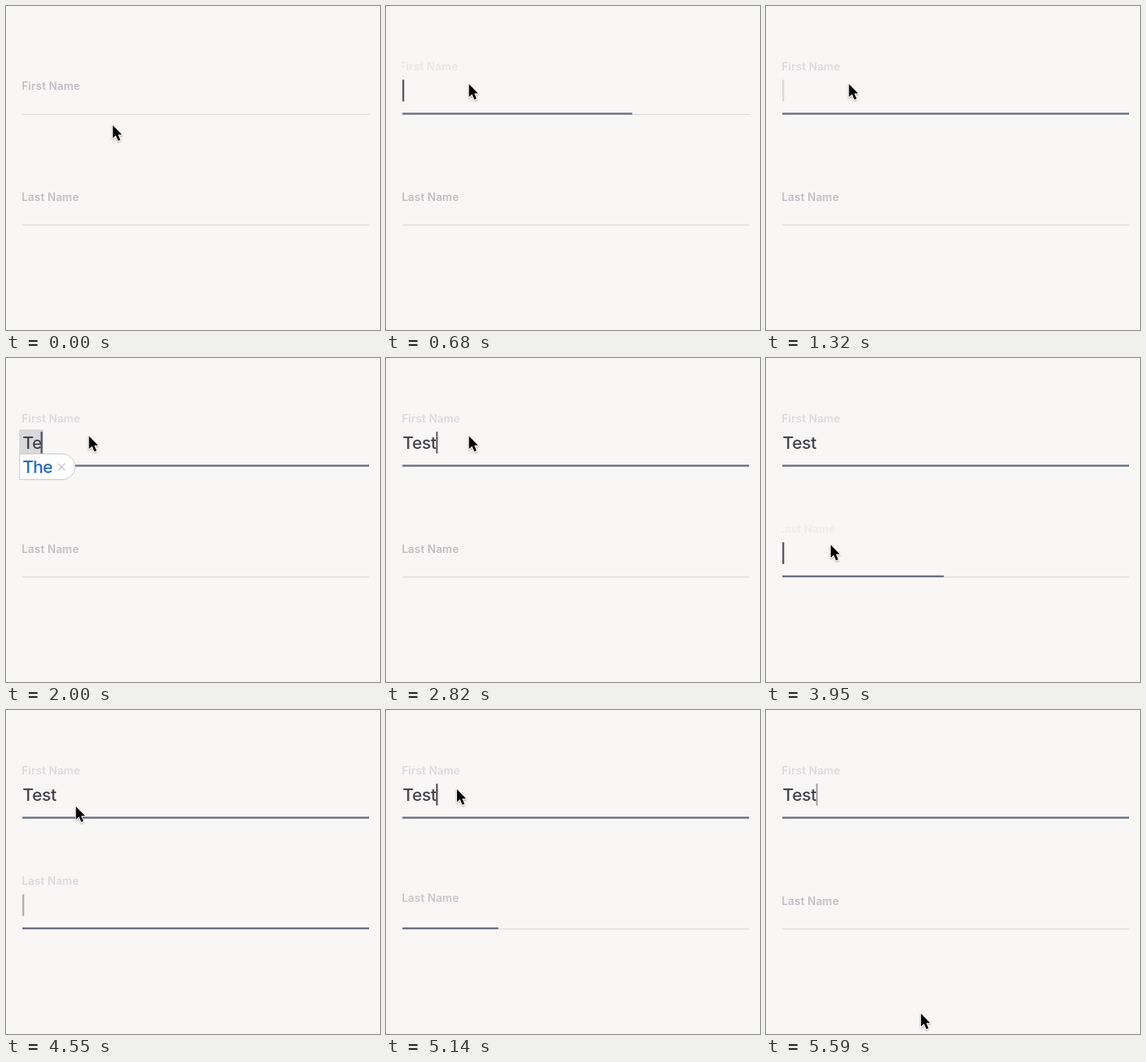
An HTML page for the animation above (5.63 s loop, 480x417 px).

```html
<!DOCTYPE html>
<html lang="en">
<head>
<meta charset="utf-8">
<title>Form fields</title>
<style>
  html, body { margin: 0; width: 100%; height: 100%; overflow: hidden; background: #f8f7f6; }
  svg { display: block; width: 100vw; height: 100vh; }
  text { font-family: Inter, "Open Sans", sans-serif; white-space: pre; }
  .label { font-size: 14px; font-weight: 600; letter-spacing: .2px; }
  .value { font-size: 22px; font-weight: 500; letter-spacing: -.4px; fill: #43434d; }
  .hint { font-size: 22px; font-weight: 500; letter-spacing: -.8px; fill: #2068c0; }
  .rule { fill: #dbdbdc; }
  .caret { fill: #56535f; }
</style>
</head>
<body>
<svg viewBox="0 0 480 417">
  <defs>
    <clipPath id="edge"><rect x="20" y="0" width="446" height="417"/></clipPath>
    <filter id="shadow" x="-50%" y="-50%" width="200%" height="200%">
      <feDropShadow dx="0" dy="1.2" stdDeviation="1.1" flood-opacity=".35"/>
    </filter>
  </defs>
  <rect width="480" height="417" fill="#f8f7f6"/>
  <g id="fields"></g>
  <rect id="mark" x="17" y="92" width="31" height="31.5" fill="#d9d9db"/>
  <text id="value" class="value" x="21.3" y="116.8"></text>
  <g id="carets"></g>
  <g id="popup">
    <path d="M17.5 123.5H72a16.5 16.5 0 0 1 0 33H17.5Z" fill="#fff" stroke="#c9c9cb"/>
    <text class="hint" x="21.3" y="147.8">The</text>
    <path d="M66.8 135.6l9 9m0-9l-9 9" stroke="#b9b9bc" stroke-width="1.2"/>
  </g>
  <path id="cursor" d="M0 0V16.6L3.9 13L6.9 20L9.7 18.8L6.8 12H11.8Z" fill="#050505"
    stroke="#fff" stroke-width="1.8" paint-order="stroke" stroke-linejoin="round" filter="url(#shadow)"/>
</svg>
<script>
const LOOP = 5630, FADE = 300;
const LEFT = 21, WIDTH = 445;
const $ = id => document.getElementById(id);
const clamp = x => Math.min(1, Math.max(0, x));
const span = (t, a, b) => clamp((t - a) / (b - a));
const smooth = p => p * p * (3 - 2 * p);

// cubic-bezier(.25, .1, .25, 1)
function ease(x) {
  const bez = (u, a, b) => 3 * a * u * (1 - u) ** 2 + 3 * b * u * u * (1 - u) + u ** 3;
  let lo = 0, hi = 1;
  for (let i = 0; i < 20; i++) {
    const mid = (lo + hi) / 2;
    if (bez(mid, .25, .25) < x) lo = mid; else hi = mid;
  }
  return bez(lo, .1, 1);
}

function add(parent, tag, attrs, text = '') {
  const el = document.createElementNS('http://www.w3.org/2000/svg', tag);
  for (const k in attrs) el.setAttribute(k, attrs[k]);
  el.textContent = text;
  parent.appendChild(el);
  return el;
}

// caret entries are [from, to, end opacity]; equal times switch hard
const fields = [
  { name: 'First Name', y: 108.2, focus: 565, blur: Infinity, ink: '#687084',
    caret: [[565, 565, 1], [1160, 1360, 0], [1590, 1590, 1], [2800, 3000, 0], [3340, 3450, 1],
            [3760, 3860, 0], [5012, 5012, 1], [5540, 5640, 0]] },
  { name: 'Last Name', y: 250.6, focus: 3868, blur: 5012, ink: '#6d6e86',
    caret: [[3868, 3868, 1], [4440, 4640, 0], [4900, 5000, 1], [5012, 5012, 0]] }
];

for (const f of fields) {
  const g = add($('fields'), 'g', {});
  add(g, 'rect', { class: 'rule', x: LEFT, y: f.y + 30.7, width: WIDTH, height: 1.2 });
  f.line = add(g, 'rect', { x: LEFT, y: f.y + 29.2, height: 2.4, fill: f.ink });
  const clip = add(g, 'g', { 'clip-path': 'url(#edge)' });
  f.label = add(clip, 'text', { class: 'label', x: 20.2, y: f.y }, f.name);
  f.bar = add($('carets'), 'rect', { class: 'caret', x: LEFT, y: f.y - 13.4, width: 2.3, height: 28 });
}

const keys = [1590, 1820, 2045, 2250];
const stops = [21, 34.3, 44.5, 56.5, 64.2];

// [start, end, x, y, bend of x]
const moves = [
  [0, 0, 137, 153.5, 1],
  [10, 330, 106.5, 100.5, 1],
  [2830, 3420, 83, 240.5, 1.5],
  [4290, 4640, 91, 102, 1],
  [5390, 5595, 199, 391, 1]
];

function pointer(t) {
  let [, , x, y] = moves[0];
  for (const [a, b, nx, ny, bend] of moves.slice(1)) {
    const p = smooth(span(t, a, b));
    x += (nx - x) * p ** bend;
    y += (ny - y) * p;
  }
  return `translate(${x} ${y})`;
}

function blink(t, list) {
  let o = 0;
  for (const [a, b, to] of list) {
    if (t >= a) o += (to - o) * (a === b ? 1 : span(t, a, b));
  }
  return o;
}

function drawField(f, t) {
  const p = ease(span(t, f.focus, f.focus + FADE));
  const q = ease(span(t, f.blur, f.blur + FADE));
  const raised = t >= f.focus && t < f.blur;
  let dx = 0, dy = 0, alpha = 1;
  if (raised) {
    dx = -8.5 * (1 - p);
    dy = -25.3;
    alpha = p ** 1.5;
  } else if (t >= f.blur) {
    dy = -12 * (1 - q);
    alpha = q ** .5;
  }
  f.label.setAttribute('transform', `translate(${dx} ${dy})`);
  f.label.setAttribute('fill', raised ? '#dadadf' : '#bfbfc4');
  f.label.setAttribute('opacity', alpha);
  f.line.setAttribute('width', WIDTH * (p - q));
  f.bar.setAttribute('opacity', blink(t, f.caret));
}

function draw(t) {
  fields.forEach(f => drawField(f, t));
  const n = keys.filter(k => t >= k).length;
  $('value').textContent = 'Test'.slice(0, n);
  fields[0].bar.setAttribute('x', stops[n]);
  const shown = t < 1995 ? 0 : 1 - span(t, 2060, 2250);
  $('popup').setAttribute('opacity', shown);
  $('mark').setAttribute('opacity', shown);
  $('cursor').setAttribute('transform', pointer(t));
}

const begin = performance.now();
function tick() {
  draw((performance.now() - begin) % LOOP);
  requestAnimationFrame(tick);
}
tick();
</script>
</body>
</html>
```
